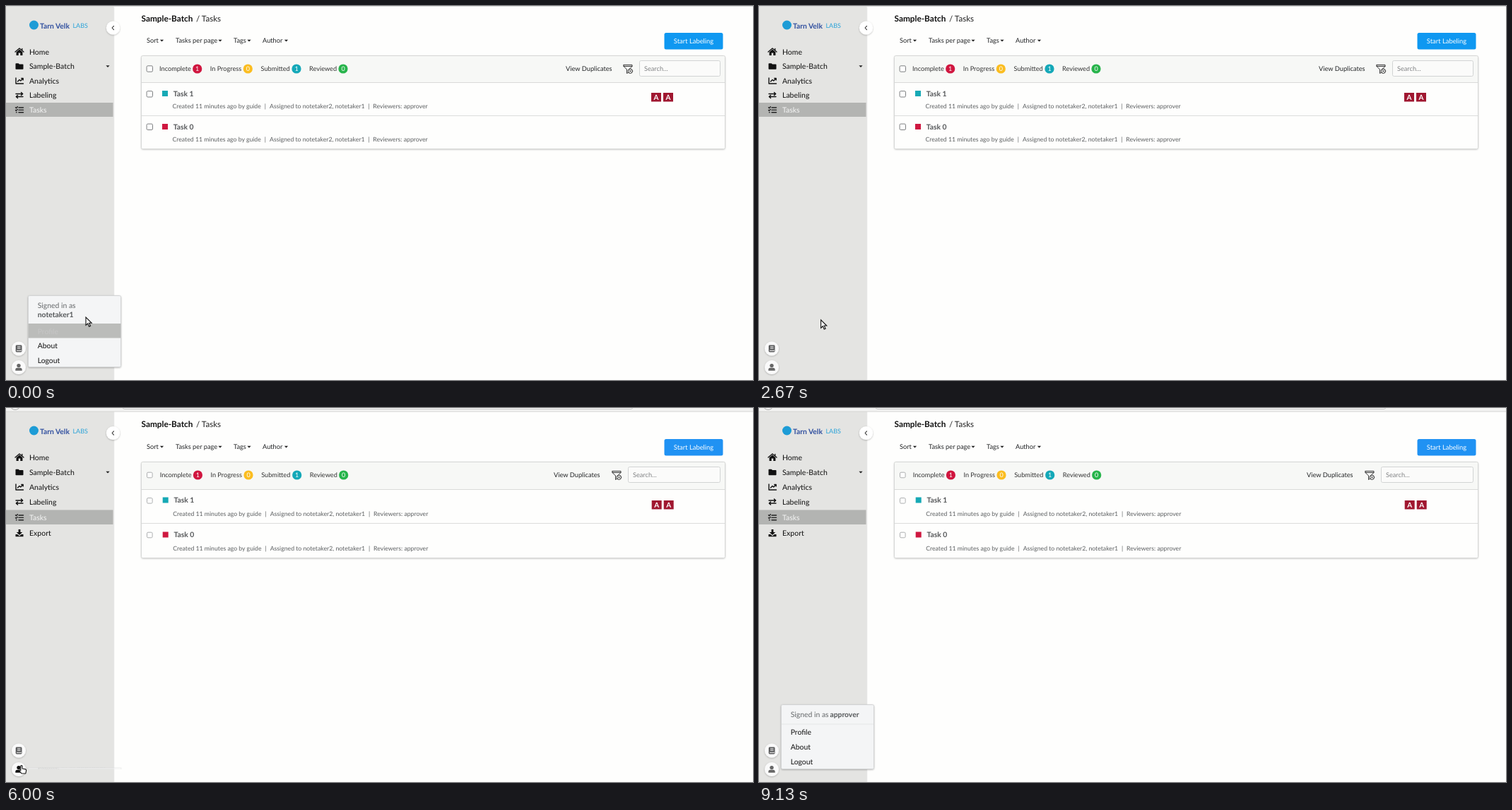
An HTML page for the animation above (9200 ms loop, 1057 by 530 pixels).

```html
<!DOCTYPE html>
<html lang="en">
<head>
<meta charset="utf-8">
<title>Task list by role</title>
<style>
  html, body { margin: 0; width: 100%; height: 100%; overflow: hidden; background: #fefefd; }
  svg { display: block; width: 1057px; height: 530px; }
  text { font-family: Lato, sans-serif; text-rendering: geometricPrecision; white-space: pre; }
  .bold { font-weight: 700; }
  .line { fill: none; stroke: currentColor; stroke-linecap: round; stroke-linejoin: round; }
</style>
</head>
<body>
<svg id="stage" viewBox="0 0 1057 530"></svg>
<script>
const PROJECT = 'Sample-Batch';
const LOOP = 9200;

const compact = {
  title: 17.4, tools: 49, button: 38, blue: '#0f98f1', fold: 31, logo: 27,
  panel: 70.5, head: 89, rows: [108, 155, 202.5], check: 8.4, checkInk: '#6f7173',
  squares: [124, 171], meta: [142, 189], checks: [124.8, 171.3], badge: 123, dx: 0,
  dup: 792, search: 896, nav: [65, 85.5, 106, 126.5, 147], band: [137, 20],
  menu: 410.5, divider: 450, items: [461, 481.5, 502], chrome: false
};
const roomy = {
  title: 22.7, tools: 55, button: 44, blue: '#2092f3', fold: 35.5, logo: 32,
  panel: 76.5, head: 95, rows: [115, 163, 212.5], check: 7.6, checkInk: '#a3a5a6',
  squares: [130.5, 179.5], meta: [150, 198.5], checks: [131.3, 180], badge: 131, dx: .7,
  dup: 775, search: 880, nav: [70, 91, 112, 133, 155, 177], band: [144.5, 20.5],
  menu: 420.5, divider: 447.5, items: [459, 480, 501], chrome: true
};

// start of each session, the moment its menu opens, layout and user
const scenes = [
  { from: 0, open: -1000, layout: compact, user: 'notetaker1' },
  { from: 2400, open: 2930, layout: compact, user: 'notetaker2' },
  { from: 5300, open: 5995, layout: roomy, user: 'approver' }
];

// pointer path: time, x, y, shape (shape holds until the next step)
const path = [
  [-400, 100, 470, 'arrow'], [-200, 108, 458, 'arrow'], [0, 113, 441, 'arrow'],
  [250, 140, 395, 'arrow'], [600, 215, 215, 'arrow'], [850, 245, 162, 'arrow'],
  [1150, 265, 143, 'beam'], [1670, 273, 139, 'beam'], [2000, 275, 140, 'beam'],
  [2400, 240, 300, 'arrow'], [2750, 40, 490, 'arrow'], [2850, 22, 507, 'hand'],
  [3150, 22, 507, 'arrow'], [3350, 90, 462, 'arrow'], [3670, 178, 407, 'arrow'],
  [4150, 186, 385, 'arrow'], [4500, 203, 230, 'arrow'], [4670, 211, 156, 'arrow'],
  [4900, 245, 142, 'arrow'], [5299, 262, 136, 'arrow'], [5300, 130, 390, 'arrow'],
  [5700, 35, 492, 'arrow'], [5820, 22, 507, 'hand'], [6250, 22, 507, 'arrow'],
  [6500, 55, 481, 'arrow'], [6750, 115, 456, 'arrow'], [7100, 172, 400, 'arrow'],
  [7500, 238, 235, 'arrow'], [7700, 268, 195, 'arrow'], [8000, 295, 143, 'arrow'],
  [8350, 305, 134, 'arrow'], [8600, 330, 85, 'arrow'], [8790, 345, 30, 'arrow'],
  [8950, 350, -25, 'arrow'], [9300, 350, -25, 'arrow']
];

const text = (x, cy, size, s, fill = '#222426', extra = '') =>
  `<text x="${x}" y="${cy + size * .36}" font-size="${size}" fill="${fill}" ${extra}>${s}</text>`;
const bold = (x, cy, size, s, fill) => text(x, cy, size, s, fill, 'class="bold"');
const mid = (x, cy, size, s, fill) => text(x, cy, size, s, fill, 'text-anchor="middle"');
const rect = (x, y, w, h, fill, extra = '') =>
  `<rect x="${x}" y="${y}" width="${w}" height="${h}" fill="${fill}" ${extra}/>`;
const circle = (x, y, r, fill, extra = '') =>
  `<circle cx="${x}" cy="${y}" r="${r}" fill="${fill}" ${extra}/>`;
const caret = (x, y) => `<path d="M${x - 2.6} ${y - 1.3}h5.2l-2.6 2.8z" fill="#222"/>`;
const at = (x, y, body, color = '#111') =>
  `<g transform="translate(${x} ${y})" color="${color}" fill="${color}">${body}</g>`;
const stroke = (d, w = 1.4) => `<path class="line" d="${d}" stroke-width="${w}"/>`;

const icons = [
  '<path d="M0-3.6 4.4.2V5H1.3V1.6h-2.6V5h-3.1V.2z"/>' + stroke('M-6 0 0-5 6 0M3.8-4.6v2.4', 1.3),
  '<path d="M-5.5-3.5q0-.8.8-.8h3.3L0-3h4.7q.8 0 .8.8v5.6q0 .8-.8.8h-9.4q-.8 0-.8-.8z"/>',
  stroke('M-5-4v8H5.5M-2.5 1 0-1.5 1.7 0 5-3.3M2.8-3.5H5.2V-1.1'),
  stroke('M-5-2H4.5M2.5-4 4.7-2 2.5 0M5 2H-4.5M-2.5 0-4.7 2-2.5 4'),
  stroke('M-5.5-3.2l1 1 1.8-2M-5.5.4l1 1 1.8-2M-1-3H5.5M-1 .4H5.5M-1 3.8H5.5M-4.5 3.8h.5'),
  '<path d="M-1.4-5h2.8v4h2.8L0 3-4.2-1h2.8z"/><path d="M-5.5 2h2.7L0 4.6 2.8 2h2.7v3.2h-11z"/>'
];
const labels = ['Home', PROJECT, 'Analytics', 'Labeling', 'Tasks', 'Export'];

function sidebar(L) {
  const nav = L.nav.map((y, i) => {
    const ink = i === 4 ? '#f6f6f5' : '#111';
    return at(19, y, icons[i], i === 4 ? '#222' : ink) + text(33, y, 10.5, labels[i], ink);
  }).join('');
  return rect(0, 0, 152, 530, '#e4e4e2', 'filter="url(#soft)"') +
    rect(0, L.band[0], 151.5, L.band[1], '#b3b4b2') + nav + caret(144, L.nav[1]) +
    circle(39.5, L.logo, 6.5, '#1d9cd6') +
    bold(48, L.logo + 1, 10.3, 'Tarn Velk', '#304f9f') + text(94.5, L.logo + 1, 9, 'LABS', '#2ba3d8') +
    circle(151.5, L.fold, 9.6, '#fff', 'filter="url(#soft)"') +
    at(151.5, L.fold, stroke('M1-2.6-1.4 0 1 2.6', 1.1), '#333') +
    circle(18, 485.5, 10, '#fafafa', 'filter="url(#soft)"') +
    at(18, 485.5, '<rect x="-4.3" y="-5" width="8.8" height="10" rx="1.4"/>' +
      '<path d="M-2-2.6h4.6M-2-.4h4.6M-3 2.8h7" stroke="#fafafa"/>', '#5a5b5c') +
    circle(18, 512, 10, '#fafafa', 'filter="url(#soft)"') +
    `<g class="person" transform="translate(18 512)" fill="#666">` +
    '<circle cy="-2.4" r="2.7"/><path d="M-4.7 4.8V3.6Q-4.7.8-2 .8H2Q4.7.8 4.7 3.6v1.2z"/></g>';
}

function tools(L) {
  const names = [[199, 'Sort', 220.5], [240, 'Tasks per page', 303], [322, 'Tags', 344], [363, 'Author', 396.5]];
  return bold(191.5, L.title, 11.8, PROJECT, '#111') + text(269, L.title, 11.6, '/ Tasks', '#222') +
    names.map(([x, s, c]) => text(x, L.tools, 9.25, s) + caret(c, L.tools)).join('') +
    rect(931.5, L.button, 83, 23.4, L.blue, 'rx="2.5"') +
    mid(973, L.button + 11.7, 9.4, 'Start Labeling', '#fff');
}

function header(L) {
  const y = L.head, s = L.search;
  const states = [[217, 'Incomplete', 270.7, 1, '#d0163f'], [288.7, 'In Progress', 342.3, 0, '#fbbd20'],
    [360.5, 'Submitted', 411, 1, '#14a8b8'], [429, 'Reviewed', 477, 0, '#27b44b']];
  return rect(191.5, L.panel, 826, L.rows[0] - L.panel, '#f7f8f6') + checkbox(L, y) +
    states.map(([x, name, cx, n, c]) => text(x + L.dx, y, 9.2, name, '#333') +
      circle(cx + L.dx, y, 6.6, c) + mid(cx + L.dx, y, 9, n, '#fff')).join('') +
    text(L.dup, y, 9.25, 'View Duplicates') +
    at(s - 16, y + .5, stroke('M-6-6H6v2L1.5.5M-6-6v2l4.5 4.5V6l2-1.2M-6-4H6', 1) +
      '<circle class="line" cx="3.4" cy="2.8" r="3.2"/>' + stroke('M2.2 1.6 4.6 4M4.6 1.6 2.2 4', .9), '#333') +
    rect(s + .5, y - 11.5, 1010 - s, 22, '#fbfbfa', 'rx="2" stroke="#d2d4d4"') +
    text(s + 7, y, 9.2, 'Search...', '#808284');
}

const checkbox = (L, y) => rect(203.3 - L.check / 2, y - L.check / 2, L.check, L.check, '#fff',
  `rx="1.6" stroke="${L.checkInk}" stroke-width=".9"`);

function row(L, i) {
  const y = L.squares[i], m = L.meta[i], d = L.dx, ink = '#5c5f61';
  const parts = [[235.5, 'Created 11 minutes ago by guide'], [365.8, '|'],
    [373, 'Assigned to notetaker2, notetaker1'], [512.3, '|'], [519.3, 'Reviewers: approver']];
  return rect(191.5, L.rows[i], 826, L.rows[i + 1] - L.rows[i], '#e9e9e7', 'class="row"') +
    checkbox(L, L.checks[i]) + rect(221 + d, y - 4, 8, 8, i ? '#cf1740' : '#16a9b5') +
    bold(236.8 + d, y, 10.3, `Task ${1 - i}`, '#555759') +
    parts.map(([x, s]) => text(x + d, m, 8.7, s, ink)).join('');
}

function panel(L) {
  const [top, split, bottom] = L.rows;
  const badges = [913, 930].map(x => rect(x + L.dx, L.badge, 14, 12.5, '#a01730') +
    `<text x="${x + 7 + L.dx}" y="${L.badge + 10}" font-size="10" class="bold" text-anchor="middle" fill="#fff">A</text>`);
  return rect(191.5, L.panel, 826, bottom - L.panel, '#fefefd', 'rx="2" filter="url(#soft)"') +
    header(L) + row(L, 0) + row(L, 1) + badges.join('') +
    rect(191.5, top, 826, 1, '#d9dad9') + rect(191.5, split, 826, 1, '#dcdddc') +
    rect(191.5, L.panel, 826, bottom - L.panel, 'none', 'rx="2" stroke="#d3d4d3" stroke-width=".9"');
}

function menu(L, user) {
  const names = ['Profile', 'About', 'Logout'];
  const signed = L.chrome
    ? text(44.7, 434.5, 10.4, 'Signed in as', '#65686a') + bold(100.5, 434.5, 10.3, user, '#55585a')
    : text(44.7, 424.7, 10.4, 'Signed in as', '#65686a') + bold(44.7, 437, 10.4, user, '#55585a');
  return `<g class="menu">` +
    rect(31.5, L.menu, 131, 511.5 - L.menu, '#f4f5f6', 'rx="2" stroke="#d3d4d5" filter="url(#soft)"') +
    signed + rect(32, L.divider, 130, 1, '#e6e7e8') +
    names.map((s, i) => rect(31.5, L.items[i] - 11, 131, 20.5, '#bbbcba', 'class="item"') +
      text(44.7, L.items[i], 10.4, s, '#111', 'class="name"')).join('') + '</g>';
}

const chrome = L => L.chrome
  ? rect(0, 0, 1057, 5, '#f3f3f2') + rect(0, 4.5, 1057, 1, '#d5d5d4') +
    rect(165, -20, 722, 21.5, '#fff', 'rx="3" stroke="#c4c4c4"') +
    circle(13, -5, 7.5, '#f8f8f8', 'stroke="#aaa"')
  : rect(0, 0, 1057, 1, '#d9dad9');

const pointers = {
  arrow: '<path d="M0 0V11.4L2.7 9 4.6 13.2 6.5 12.4 4.6 8.3H8.2Z" fill="#fff" stroke="#111" stroke-width="1.1"/>',
  beam: stroke('M-2.3-5.2Q0-5.2 0-3.6Q0-5.2 2.3-5.2M0-3.6V3.8M-2.3 5.4Q0 5.4 0 3.8Q0 5.4 2.3 5.4M-1 1H1', 1.3),
  hand: '<path d="M-1.2.2Q0-1 1 .2V4l4.5.9Q6.8 5.2 6.6 6.8L5.8 11H0L-3.3 6.8Q-3.2 5.4-1.2 6.6z" ' +
    'fill="#fff" stroke="#111" stroke-width="1.1" stroke-linejoin="round"/>'
};

const stage = document.getElementById('stage');
stage.innerHTML = `<defs><filter id="soft" x="-20%" y="-20%" width="140%" height="140%">
  <feDropShadow dx="0" dy=".8" stdDeviation="1" flood-color="#000" flood-opacity=".28"/></filter></defs>` +
  rect(0, 0, 1057, 530, '#fefefd') +
  scenes.map(({ layout: L, user }) =>
    `<g class="scene">${sidebar(L) + tools(L) + panel(L) + menu(L, user) + chrome(L)}</g>`).join('') +
  Object.values(pointers).map(p => `<g class="pointer" color="#111">${p}</g>`).join('');

const views = [...stage.querySelectorAll('.scene')].map(el => ({
  el, rows: [...el.querySelectorAll('.row')], items: [...el.querySelectorAll('.item')],
  names: [...el.querySelectorAll('.name')], menu: el.querySelector('.menu'), person: el.querySelector('.person')
}));
const pointerEls = [...stage.querySelectorAll('.pointer')];
const shapes = Object.keys(pointers);

function pointerAt(t) {
  let i = 0;
  while (i < path.length - 2 && path[i + 1][0] <= t) i++;
  const [t0, x0, y0, shape] = path[i], [t1, x1, y1] = path[i + 1];
  const p = (t - t0) / (t1 - t0);
  return { x: x0 + (x1 - x0) * p, y: y0 + (y1 - y0) * p, shape };
}

// Highlights trail the pointer and fade briefly.
const hover = (t, from, x0, x1, y0, y1) => [140, 170, 200].reduce((sum, lag) => {
  const p = pointerAt(t - lag);
  const seen = from === 0 || t - lag >= from;
  return sum + (seen && p.x >= x0 && p.x <= x1 && p.y >= y0 && p.y < y1) / 3;
}, 0);

function draw(t) {
  const current = scenes.findLastIndex(s => t >= s.from);
  views.forEach((v, i) => v.el.setAttribute('display', i === current ? 'inline' : 'none'));
  const { from, open, layout: L } = scenes[current], view = views[current];

  view.rows.forEach((el, i) =>
    el.setAttribute('opacity', hover(t, from, 191, 1017, L.rows[i], L.rows[i + 1])));

  const grow = Math.max(0, Math.min(1, (t - open) / 200));
  view.menu.setAttribute('display', grow > 0 ? 'inline' : 'none');
  view.menu.setAttribute('opacity', .4 + .6 * grow);
  view.menu.setAttribute('transform', `translate(0 ${512 * (1 - grow)}) scale(1 ${grow})`);
  view.items.forEach((el, i) => {
    const h = hover(t, from, 31, 163, L.items[i] - 11, L.items[i] + 9.5);
    const ink = Math.round(17 + 181 * h);
    el.setAttribute('opacity', h);
    view.names[i].setAttribute('fill', `rgb(${ink},${ink},${ink})`);
  });

  const p = pointerAt(t);
  view.person.setAttribute('fill', Math.hypot(p.x - 18, p.y - 512) < 10 ? '#111' : '#666');
  pointerEls.forEach((el, i) => {
    el.setAttribute('display', shapes[i] === p.shape ? 'inline' : 'none');
    el.setAttribute('transform', `translate(${p.x} ${p.y})`);
  });
}

const start = performance.now();
function tick() {
  const t = (performance.now() - start) % LOOP;
  draw(Math.floor(t * .015 + .1) / .015); // 15 steps a second
  requestAnimationFrame(tick);
}
tick();
</script>
</body>
</html>
```
